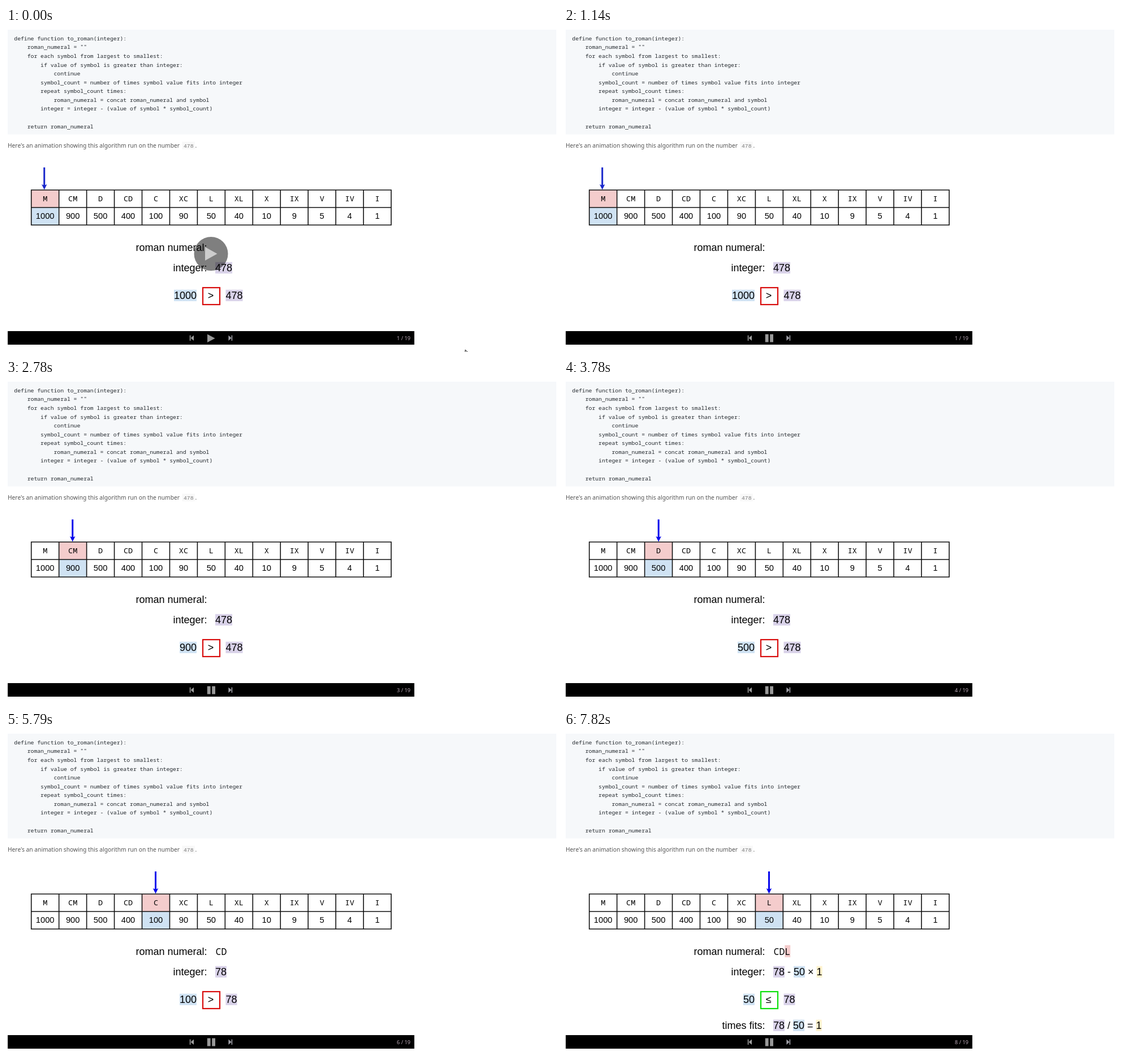
Write an HTML page that moves like this. It is 976 px wide and 574 px high and loops after 8 s.

```html
<!DOCTYPE html>
<html lang="en">
<head>
<meta charset="utf-8">
<title>Roman numeral walkthrough</title>
<style>
  html, body { margin: 0; width: 100%; height: 100%; overflow: hidden; background: #fff; }
  svg { display: block; }
  text { font-family: "Liberation Sans", Arial, sans-serif; white-space: pre; }
  .code { font: 9.75px "Noto Sans Mono", monospace; fill: #24292e; }
  .prose { font: 10.24px "Noto Sans", sans-serif; fill: #555; }
  .inline { font: 9.75px "Liberation Mono", monospace; fill: #777; }
  .symbol { font: 13.45px "Noto Sans Mono", monospace; }
  .value { font-size: 14.67px; }
  .big { font-size: 18px; }
  .numeral { font: 16.5px "Noto Sans Mono", monospace; }
  .page { font: 9.2px "Noto Sans", sans-serif; fill: #bcaab8; }
</style>
</head>
<body>
<svg id="stage" width="976" height="574" viewBox="0 0 976 574"></svg>
<script>
const LOOP = 8000;
const STEP = 76;
const PINK = '#f4cccc', BLUE = '#cfe2f3', PURPLE = '#d9d2e9', YELLOW = '#fff2cc';
const TABLE = { x: 44.7, y: 287, col: 48.95, row: 31 };

const CODE = `define function to_roman(integer):
    roman_numeral = ""
    for each symbol from largest to smallest:
        if value of symbol is greater than integer:
            continue
        symbol_count = number of times symbol value fits into integer
        repeat symbol_count times:
            roman_numeral = concat roman_numeral and symbol
        integer = integer - (value of symbol * symbol_count)

    return roman_numeral`.split('\n');

const SYMBOLS = 'M CM D CD C XC L XL X IX V IV I'.split(' ');
const VALUES = [1000, 900, 500, 400, 100, 90, 50, 40, 10, 9, 5, 4, 1];
const ARROW_X = [67.7, 117.7, 167.2, 217.2, 264.5, 314, 362.5];

// "done" shows the subtraction already carried out.
const SLIDES = [
  { at: 0, col: 0, integer: 478, numeral: '' },
  { at: 1840, col: 1, integer: 478, numeral: '' },
  { at: 2850, col: 2, integer: 478, numeral: '' },
  { at: 3860, col: 3, integer: 478, numeral: '' },
  { at: 4780, col: 3, integer: 478, numeral: '', done: true },
  { at: 5790, col: 4, integer: 78, numeral: 'CD' },
  { at: 6810, col: 5, integer: 78, numeral: 'CD' },
  { at: 7820, col: 6, integer: 78, numeral: 'CD' }
];
const PAGE_TIMES = [0, 1840, 2780, 3780, 4780, 5790, 6720, 7820];
const PLAY_AT = 760, CURSOR_GONE = 1140;
const CURSOR_PATH = [
  [0, 811.5, 569.5], [330, 600, 480], [610, 402, 410], [760, 381, 413],
  [836, 393, 456], [912, 406, 490], [988, 425, 526], [1064, 434, 545]
];

const stage = document.getElementById('stage');

function add(parent, tag, attrs = {}, content) {
  const node = document.createElementNS('http://www.w3.org/2000/svg', tag);
  for (const key in attrs) node.setAttribute(key, attrs[key]);
  if (content !== undefined) node.textContent = content;
  parent.appendChild(node);
  return node;
}
const group = () => add(stage, 'g');
const rect = (parent, x, y, width, height, fill) =>
  add(parent, 'rect', { x, y, width, height, fill });
const path = (parent, d, fill, more) => add(parent, 'path', { d, fill, ...more });
const text = (parent, x, y, cls, content, anchor = 'start') =>
  add(parent, 'text', { x, y, class: cls, 'text-anchor': anchor }, content);
const label = (parent, y, content) => text(parent, 355.5, y, 'big', content, 'end');
const columnX = i => TABLE.x + i * TABLE.col;

// Lays out [content, highlight] pieces one after another.
function run(parent, x, y, pieces, cls = 'big', gap = 5) {
  for (const [content, color] of pieces) {
    const node = text(parent, x, y, cls, content);
    const width = node.getComputedTextLength();
    if (color) {
      const mono = cls === 'numeral';
      const box = rect(parent, x, y - (mono ? 17.2 : 16.3), width, mono ? 21.5 : 20.2, color);
      parent.insertBefore(box, node);
    }
    x += width + gap;
  }
}

function drawPage() {
  const g = group();
  rect(g, 3, 3, 970, 185.5, '#f6f8fa');
  CODE.forEach((line, i) => text(g, 14.3, 21.8 + i * 15.58, 'code', line));
  text(g, 3, 211.7, 'prose', "Here's an animation showing this algorithm run on the number");
  rect(g, 311.5, 201.5, 22.5, 13.5, '#f8f8f8');
  text(g, 314, 211.7, 'inline', '478');
  text(g, 334.6, 211.7, 'prose', '.');
}

function drawTable() {
  const g = group();
  const { x, y, col, row } = TABLE;
  const right = x + 13 * col;
  let lines = '';
  for (let i = 0; i < 3; i++) lines += `M${x - 0.8} ${y + i * row}H${right + 0.8}`;
  for (let i = 0; i < 14; i++) lines += `M${columnX(i)} ${y}V${y + 2 * row}`;
  path(g, lines, 'none', { stroke: '#111', 'stroke-width': 1.6 });
  SYMBOLS.forEach((symbol, i) => {
    const mid = columnX(i) + col / 2;
    text(g, mid, 306.9, 'symbol', symbol, 'middle');
    text(g, mid, 338.4, 'value', VALUES[i], 'middle');
  });
  label(g, 395, 'roman numeral:');
  label(g, 431, 'integer:');
}

function drawBar() {
  const g = group();
  rect(g, 3, 537, 719, 24, '#000');
  path(g, 'M324.8 544.5h1.6v9.6h-1.6zM332 544.5v9.6l-5.4-4.8z', '#a0a0a0');
  path(g, 'M398.6 544.5h1.6v9.6h-1.6zM393.4 544.5v9.6l5.2-4.8z', '#a0a0a8');
}

function drawCells(parent, slide) {
  const x = columnX(slide.col);
  rect(parent, x, TABLE.y, TABLE.col, TABLE.row, PINK);
  rect(parent, x, TABLE.y + TABLE.row, TABLE.col, TABLE.row, BLUE);
}

function drawSlide(parent, slide) {
  const { col, integer, numeral, done } = slide;
  const value = VALUES[col];
  const fits = value <= integer;
  const a = ARROW_X[col];

  path(parent, `M${a - 1.5} 247h3v31.2l3.2-1.2-4.7 9.4-4.7-9.4 3.2 1.2z`,
    col ? '#0505ec' : '#1a28cb');

  const letters = [];
  if (numeral) letters.push([numeral]);
  if (fits) letters.push([SYMBOLS[col], PINK]);
  run(parent, 370.5, 394.8, letters, 'numeral', 0);

  const sum = done ? [[integer - value]]
    : fits ? [[integer, PURPLE], ['-'], [value, BLUE], ['×'], [1, YELLOW]]
    : [[integer, PURPLE]];
  run(parent, 370, 431, sum);

  run(parent, 337 - String(value).length * 10.01, 480, [[value, BLUE]]);
  run(parent, 388.5, 480, [[integer, PURPLE]]);
  add(parent, 'rect', {
    x: 348, y: 460, width: 30, height: 30, fill: 'none',
    stroke: fits ? '#0be00b' : '#d80c0c', 'stroke-width': 2.2
  });
  text(parent, 362, 480, 'big', fits ? '≤' : '>', 'middle');

  if (fits) {
    label(parent, 526, 'times fits:');
    run(parent, 370, 526, [[integer, PURPLE], ['/'], [value, BLUE], ['='], [1, YELLOW]]);
  }
}

drawPage();
const cells = group();
drawTable();
const slideLayer = group();
drawBar();
const playIcon = path(stage, 'M356 542.4v14.6l13.6-7.3z', '#999');
const pauseIcon = path(stage, 'M355.8 542.5h5.8v14h-5.8zM364.2 542.5h5.8v14h-5.8z', '#999');
const pageLabel = text(stage, 691, 553.2, 'page', '');
const overlay = group();
add(overlay, 'circle', { cx: 362.5, cy: 400, r: 30, fill: '#000', opacity: 0.5 });
path(overlay, 'M352 388v24l21.5-12z', '#ccc');
const cursor = path(stage, 'M.5.5v15.5l3.6-3.4 2.4 5.6 2.3-1-2.4-5.5h5z', '#fff', { stroke: '#111' });

const indexAt = (times, t) => times.filter(at => at <= t).length - 1;
const show = (node, on) => node.setAttribute('visibility', on ? 'visible' : 'hidden');

function cursorAt(t) {
  const i = Math.min(indexAt(CURSOR_PATH.map(p => p[0]), t), CURSOR_PATH.length - 2);
  const [t0, x0, y0] = CURSOR_PATH[i], [t1, x1, y1] = CURSOR_PATH[i + 1];
  const k = Math.min(1, (t - t0) / (t1 - t0));
  return [x0 + (x1 - x0) * k, y0 + (y1 - y0) * k];
}

let shown = -1;
function render(t) {
  const index = indexAt(SLIDES.map(s => s.at), t);
  if (index !== shown) {
    shown = index;
    cells.replaceChildren();
    slideLayer.replaceChildren();
    drawCells(cells, SLIDES[index]);
    drawSlide(slideLayer, SLIDES[index]);
  }
  pageLabel.textContent = `${indexAt(PAGE_TIMES, t) + 1} / 19`;
  const playing = t >= PLAY_AT;
  show(overlay, !playing);
  show(playIcon, !playing);
  show(pauseIcon, playing);
  show(cursor, t < CURSOR_GONE);
  const [x, y] = cursorAt(Math.floor(t / STEP) * STEP);
  cursor.setAttribute('transform', `translate(${x} ${y})`);
}

const start = performance.now();
function frame() {
  render((performance.now() - start) % LOOP);
  requestAnimationFrame(frame);
}
frame();
</script>
</body>
</html>
```
